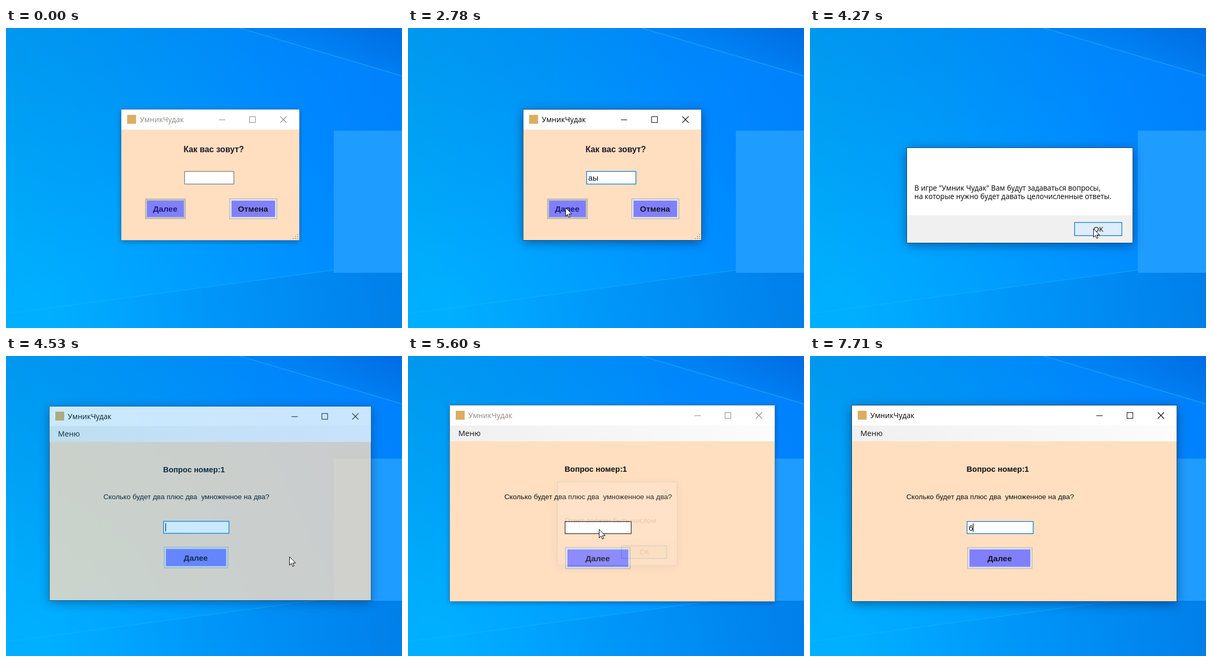
Animation, 755 px wide and 570 px high, one loop 8000 ms. Source, as an HTML page:

```html
<!DOCTYPE html>
<html lang="ru">
<head>
<meta charset="utf-8">
<style>
  html, body { margin: 0; width: 100%; height: 100%; overflow: hidden; background: #0090ff; }
  svg { display: block; }
  text { white-space: pre; }
  .ui { font-family: "Open Sans", "Noto Sans", sans-serif; }
  .label { font-family: "Liberation Sans", Arial, sans-serif; }
  .bold { font-weight: bold; }
  .mid { text-anchor: middle; }
</style>
</head>
<body>
<svg width="755" height="570" viewBox="0 0 755 570">
  <defs>
    <linearGradient id="sky" x1="0" y1=".7" x2="1" y2=".35">
      <stop offset="0" stop-color="#00b0ff"/>
      <stop offset=".45" stop-color="#009aff"/>
      <stop offset=".8" stop-color="#0088ff"/>
      <stop offset="1" stop-color="#0082fc"/>
    </linearGradient>
    <linearGradient id="dusk" x1="0" y1="0" x2=".5" y2=".5">
      <stop offset="0" stop-color="#0078c8" stop-opacity=".3"/>
      <stop offset="1" stop-color="#0078c8" stop-opacity="0"/>
    </linearGradient>
    <linearGradient id="corner" x1="0" y1=".6" x2="1" y2="0">
      <stop offset="0" stop-color="#008cfa"/>
      <stop offset=".5" stop-color="#007ff2"/>
      <stop offset="1" stop-color="#006ce2"/>
    </linearGradient>
    <linearGradient id="floor" x1="0" y1="0" x2="1" y2="0">
      <stop offset="0" stop-color="#00b4ff" stop-opacity="0"/>
      <stop offset=".5" stop-color="#0090f4" stop-opacity=".5"/>
      <stop offset="1" stop-color="#007ce0" stop-opacity=".7"/>
    </linearGradient>
    <linearGradient id="strip">
      <stop offset="0" stop-color="#f0f0f0"/>
      <stop offset="1" stop-color="#fcfcfc"/>
    </linearGradient>
  </defs>
  <rect width="755" height="570" fill="url(#sky)"/>
  <rect width="755" height="570" fill="url(#dusk)"/>
  <path d="M445 0L755 91V0Z" fill="url(#corner)"/>
  <path d="M445 0L755 91" stroke="#22a4ff" stroke-width="1.5" opacity=".8"/>
  <path d="M0 543L625 460H755V570H0Z" fill="url(#floor)"/>
  <path d="M0 543L625 460" stroke="#1cb8ff" stroke-width="1.5" opacity=".45"/>
  <rect x="625" y="195" width="270" height="270" fill="#1f9cff"/>
  <g id="scene"></g>
</svg>
<script>
const LOOP = 8000;
const NAME = 'УмникЧудак';
const scene = document.getElementById('scene');

// [time, x, y] of the pointer tip
const path = [
  [170, 625, 495], [830, 407, 284], [2070, 407, 284], [2600, 300, 341], [3700, 300, 341],
  [4200, 540, 381], [4600, 540, 381], [5000, 420, 380], [5350, 364, 329], [5930, 364, 329],
  [6300, 447, 375], [6500, 447, 375], [6950, 402, 325], [LOOP, 402, 325]
];

const clamp = v => Math.max(0, Math.min(1, v));
const within = (t, a, b) => t >= a && t < b;

function pointerAt(t) {
  const i = path.findIndex(k => k[0] > t);
  if (i < 1) return { x: path[0][1], y: path[0][2] };
  const [t0, x0, y0] = path[i - 1], [t1, x1, y1] = path[i];
  const p = (t - t0) / (t1 - t0), e = p * p * (3 - 2 * p);
  return { x: x0 + (x1 - x0) * e, y: y0 + (y1 - y0) * e };
}

const inside = (p, [x, y, w, h]) => p.x >= x && p.x <= x + w && p.y >= y && p.y <= y + h;

const rect = (x, y, w, h, fill, more = '') =>
  `<rect x="${x}" y="${y}" width="${w}" height="${h}" fill="${fill}" ${more}/>`;
const line = (d, color, width = 1) =>
  `<path d="${d}" fill="none" stroke="${color}" stroke-width="${width}"/>`;
const text = (x, y, s, size, cls, fill = '#101010') =>
  `<text x="${x}" y="${y}" font-size="${size}" class="${cls}" fill="${fill}">${s}</text>`;
const cross = (x, y, color) =>
  line(`M${x - 6} ${y - 6}l12 12m0 -12l-12 12`, color, 1.1);

// Windows fade in while growing from 95 %, and shrink back as they fade out
function popup([x, y, w, h], t, open, close, draw) {
  const p = clamp((t - open) / 250);
  const a = (1 - (1 - p) ** 2) * (1 - clamp((t - close) / 140));
  if (a <= 0) return '';
  const cx = x + w / 2, cy = y + h / 2;
  return `<g opacity="${a}" transform="translate(${cx} ${cy}) scale(${.95 + .05 * a}) translate(${-cx} ${-cy})">${draw()}</g>`;
}

function frame([x, y, w, h], fill, active) {
  const shadow = active ? '0 4px 10px rgba(0,20,60,.5)' : '0 2px 5px rgba(0,20,60,.45)';
  return rect(x, y, w, h, fill, `style="filter:drop-shadow(${shadow})"`) +
    rect(x - .5, y - .5, w + 1, h + 1, 'none', `stroke="${active ? '#12466e' : '#4f87a8'}"`);
}

function form(box, active) {
  const [x, y, w] = box, r = x + w, ink = active ? '#000' : '#8c8783', m = y + 19;
  return frame(box, '#ffdfc0', active) +
    rect(x, y, w, 38, '#fff') +
    rect(x + 11, y + 10, 17, 17, '#dcae62') +
    text(x + 35, y + 24, NAME, 14.1, 'ui', ink) +
    line(`M${r - 153} ${m + .5}h12`, ink) +
    rect(r - 94.5, m - 5.5, 11, 11, 'none', `stroke="${ink}"`) +
    cross(r - 30, m, ink);
}

function button([x, y, w, h], label, size, dim) {
  return rect(x + .5, y + .5, w - 1, h - 1, dim ? '#c3c0b6' : '#e4e3e6', `stroke="${dim ? '#bebbb2' : '#adadad'}"`) +
    rect(x + 4, y + 4, w - 8, h - 8, '#8080ff') +
    text(x + w / 2 - .5, y + h / 2 + 5.7, label, size, 'label bold mid', dim ? '#1a1a78' : '#151520');
}

function field([x, y, w, h], value, active, hover, caret) {
  const edge = active ? '#0078d7' : hover ? '#171717' : '#7a7a7a';
  const cx = value ? x + 3 + value.length * 8.5 : x + 4;
  return rect(x + .5, y + .5, w - 1, h - 1, '#fff', `stroke="${edge}" stroke-width="1.3"`) +
    text(x + 3.5, y + 18, value, 15.3, 'label') +
    (caret ? rect(cx, y + 4, 1.2, 16, '#000') : '');
}

function message(box, lines, hot, closable = true) {
  const [x, y, w, h] = box, r = x + w, b = y + h;
  return frame(box, '#fff', true) +
    rect(x, b - 52, w, 52, '#f0f0f0') +
    (closable ? cross(r - 22, y + 19, '#111') : '') +
    lines.map((s, i) => text(x + 14, y + 80.5 + i * 16.7, s, 13.7, 'ui', '#000')).join('') +
    rect(r - 110.5, b - 38.5, 90, 25, hot ? '#deedf9' : '#e1e1e1', `stroke="#0078d7" stroke-width="${hot ? 1.3 : 2}"`) +
    text(r - 65, b - 21, 'OK', 13.5, 'ui mid', '#000');
}

function cursor({ x, y }, beam) {
  return beam
    ? line(`M${x - 3} ${y - 8.5}h6m-3 0v17m-3 0h6`, '#111')
    : `<path transform="translate(${x + .5} ${y + .5})" d="M0 0V16L3.7 12.6 6.2 18.3 8.6 17.2 6.2 11.7H11.5Z" fill="#fff" stroke="#000"/>`;
}

const nameBox = [220, 155, 339, 248], nameField = [340, 272, 95, 25], nextBtn = [265, 324, 78, 39];
const gameBox = [80, 94, 619, 372], gameField = [299, 314, 127, 24];
const rulesBox = [185, 228, 430, 180], errorBox = [280, 236, 238, 165];

function nameForm(t, p) {
  const active = t >= 760;
  const value = t < 1460 ? '' : t < 1570 ? 'а' : 'аы';
  const grip = [[8, 0], [4, 4], [8, 4], [0, 8], [4, 8], [8, 8]]
    .map(([x, y]) => rect(547 + x, 391 + y, 2, 2, '#b5aca2')).join('');
  return form(nameBox, active) +
    text(396, 235.5, 'Как вас зовут?', 15.8, 'label bold mid', '#20182c') +
    field(nameField, value, active, inside(p, nameField), within(t, 1460, 2070)) +
    button(nextBtn, 'Далее', 15.5, t < 1460 || t > 2070 && inside(p, nextBtn)) +
    button([426, 324, 91, 39], 'Отмена', 15.4) + grip;
}

function gameForm(t, p, active) {
  const value = t >= 7710 ? '6' : '';
  return form(gameBox, active) +
    rect(80, 132, 619, 30, 'url(#strip)') +
    text(96, 152, 'Меню', 14.5, 'ui') +
    text(358, 220, 'Вопрос номер:1', 14.9, 'label bold mid') +
    text(343.5, 272, 'Сколько будет два плюс два  умноженное на два?', 13.7, 'label mid') +
    field(gameField, value, active, inside(p, gameField), t < 5000 || t >= 7400) +
    button([300, 363.5, 124, 41], 'Далее', 15.5);
}

function draw(t) {
  const p = pointerAt(t);
  const gameActive = t < 5587 || t >= 6440;
  const beam = t < 2920 ? t > 760 && inside(p, nameField)
    : t > 4400 && gameActive && inside(p, gameField);
  const shown = within(t, 170, 1460) || within(t, 2070, 7710);
  scene.innerHTML =
    popup(nameBox, t, -500, 2900, () => nameForm(t, p)) +
    popup(gameBox, t, 4395, LOOP, () => gameForm(t, p, gameActive)) +
    popup(rulesBox, t, 2965, 4280, () => message(rulesBox, [
      'В игре "Умник Чудак" Вам будут задаваться вопросы,',
      'на которые нужно будет давать целочисленные ответы.'
    ], inside(p, [504, 369, 91, 26]), t < 4200)) +
    popup(errorBox, t, 5587, 6440, () => message(errorBox, ['Ответ должен быть числом'],
      inside(p, [407, 362, 91, 26]))) +
    (shown ? cursor(p, beam) : '');
}

const start = performance.now();
function tick() {
  draw((performance.now() - start) % LOOP);
  requestAnimationFrame(tick);
}
tick();
</script>
</body>
</html>
```
